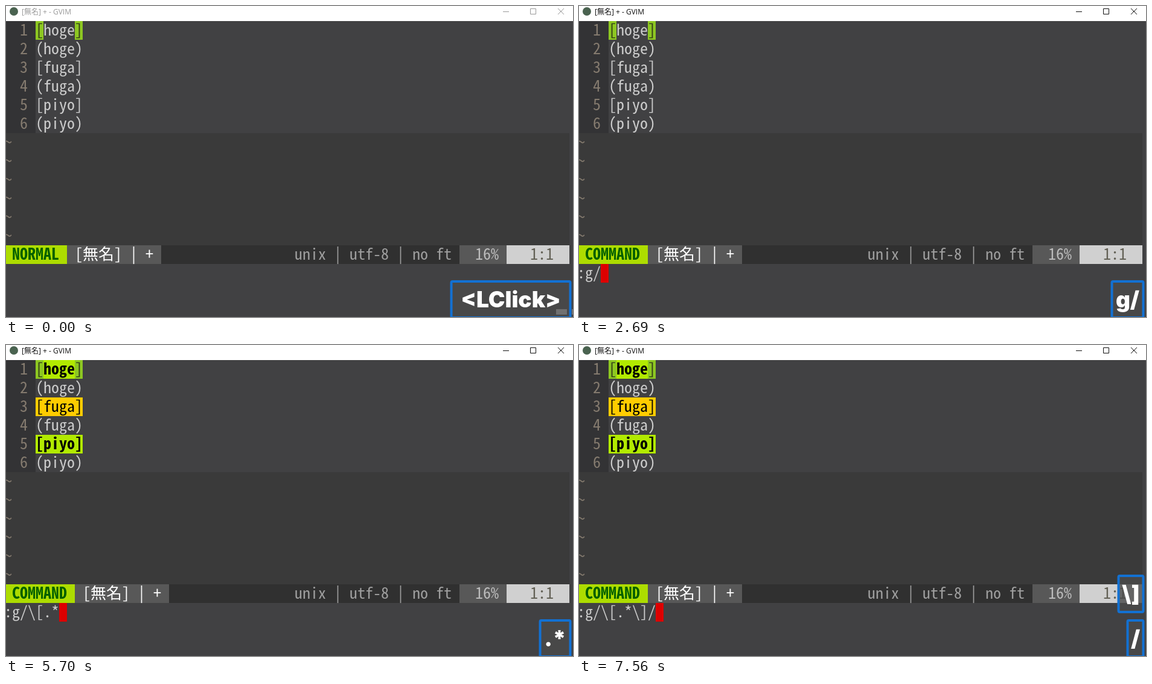
Recreate the animation shown at these times as an HTML page. Size 939x516 px, loop 8 s.

```html
<!DOCTYPE html>
<html lang="ja">
<head>
<meta charset="utf-8">
<title>Editor session</title>
<style>
html, body { margin: 0; width: 100%; height: 100%; overflow: hidden; background: #414143; }
svg { display: block; width: 939px; height: 516px; }
text { white-space: pre; }
.mono { font: 26px "Noto Sans Mono CJK JP", "Noto Sans CJK JP", "Noto Sans Mono", monospace; }
.bold { font-weight: 700; }
.title { font: 12px "Open Sans", "Noto Sans CJK JP", sans-serif; }
.pop { font: 900 37px Inter, "DejaVu Sans", sans-serif; text-anchor: middle; fill: #fff; }
</style>
</head>
<body>
<svg id="stage" viewBox="0 0 939 516"></svg>
<script>
const LOOP = 8000, CELL = 13, ROW = 31, TOP = 25;
const LINES = ['[hoge]', '(hoge)', '[fuga]', '(fuga)', '[piyo]', '(piyo)'];
const LIME = '#b2ea00', GOLD = '#ffcc00', PAREN = '#8dc722', RED = '#dd0000';

// time and text of the command line
const KEYS = [[210, ':'], [1590, 'g'], [1760, '/'], [3240, '\\'], [3720, '['],
  [5370, '.'], [5700, '*'], [6560, '\\'], [7250, ']'], [7560, '/']];
const BLINKS = [[910, 1110], [1510, 1590], [2490, 2690], [3090, 3240],
  [4450, 4710], [5110, 5370], [6430, 6560]];
const MATCHED = { ':g/\\[': 1, ':g/\\[.': 2, ':g/\\[.*': 6, ':g/\\[.*\\]': 6, ':g/\\[.*\\]/': 6 };

// key popups: start, end, label, width, slot, start of fade
const POPUPS = [
  [0, 70, '<LClick>', 201, 0],
  [210, 1590, ':', 33, 0, 1370],
  [1590, 1760, 'g', 46, 0],
  [1760, 3240, 'g/', 56, 0, 2990],
  [3240, 3720, '\\', 30, 0],
  [3720, 5370, '\\[', 45, 0, 4910],
  [5370, 5700, '.', 33, 0],
  [5700, 6560, '.*', 54, 0],
  [6560, 7250, '.*', 54, 1, 6960],
  [6560, 7250, '\\', 30, 0],
  [7250, 7560, '\\]', 45, 0],
  [7560, LOOP, '\\]', 45, 1],
  [7560, LOOP, '/', 30, 0]
];

const stage = document.getElementById('stage');
let layer = stage;

function add(tag, attrs, text) {
  const node = document.createElementNS('http://www.w3.org/2000/svg', tag);
  for (const name in attrs) node.setAttribute(name, attrs[name]);
  if (text) node.textContent = text;
  layer.append(node);
  return node;
}
const rect = (x, y, width, height, fill) => add('rect', { x, y, width, height, fill });
const colX = col => col * CELL - 3;
const rowY = row => TOP + row * ROW;
const block = (col, row, cells, fill) => rect(colX(col), rowY(row), cells * CELL, ROW, fill);

// text on the character grid; wide characters take two cells
function put(col, row, text, fill, bold) {
  const xs = [];
  for (const ch of text) {
    xs.push(colX(col));
    col += ch > '\u2fff' ? 2 : 1;
  }
  add('text', { x: xs.join(' '), y: rowY(row) + 24, fill, class: bold ? 'mono bold' : 'mono' }, text);
}
function mark(col, row, text, bg, fill, bold) {
  block(col, row, text.length, bg);
  put(col, row, text, fill, bold);
}

function drawTitle(active) {
  const ink = active ? '#111' : '#999';
  rect(0, 0, 939, TOP, '#fff');
  add('circle', { cx: 13, cy: 9, r: 7, fill: '#4a6350' });
  add('text', { x: 26, y: 14, fill: ink, class: 'title' }, '[無名] + - GVIM');
  add('path', { d: 'M823 9.5h10M868.5 4.5h9v9h-9zM914 4l10 10M924 4l-10 10', fill: 'none', stroke: ink });
}

function drawBuffer(matched, focused) {
  rect(0, TOP, 49, 6 * ROW, '#333335');
  rect(0, rowY(6), 933, 6 * ROW, '#3a3a3a');
  LINES.forEach((line, i) => {
    put(2, i, String(i + 1), '#857b6f');
    put(4, i, line, '#cccccc');
    if (matched && i % 2 === 0) {
      const gold = i === 2;
      mark(4, i, line.slice(0, matched), gold ? GOLD : LIME, '#000', !gold);
    }
    put(0, i + 6, '~', '#857b6f');
  });
  mark(4, 0, '[', focused ? RED : PAREN, focused ? '#fff' : '#303a18');
  mark(9, 0, ']', PAREN, '#303a18');
}

function drawStatus(mode) {
  const end = mode.length + 2;
  rect(0, 397, 933, ROW, '#303030');
  block(0, 12, end, '#addc00');
  put(1, 12, mode, '#005f00', true);
  block(end, 12, 12, '#585858');
  put(end + 1, 12, '[無名] | +', '#fff');
  put(37, 12, 'unix | utf-8 | no ft', '#9e9e9e');
  block(58, 12, 6, '#585858');
  put(60, 12, '16%', '#bcbcbc');
  block(64, 12, 8, '#d0d0d0');
  put(67, 12, '1:1', '#626055');
}

function drawPopup(label, width, slot, opacity) {
  const x = 936.5 - width, y = 455 - slot * 74, outer = layer;
  layer = add('g', { opacity });
  add('rect', { x: x + 2, y: y + 2, width: width - 4, height: 60, rx: 2,
    fill: 'rgba(74,74,74,.8)', stroke: '#1271d3', 'stroke-width': 4 });
  add('text', { x: x + width / 2, y: y + 45, class: 'pop' }, label);
  layer = outer;
}

function fade(age) {
  if (!(age >= 0)) return 1;
  return age < 90 ? 0.86 : Math.max(0, 0.58 - 0.2 * Math.floor((age - 90) / 60));
}

function draw(state) {
  const { cmd, active, cursor, popups } = state;
  stage.replaceChildren();
  rect(0, 0, 939, 516, '#414143');
  drawTitle(active);
  drawBuffer(MATCHED[cmd] || 0, active && !cmd);
  drawStatus(cmd ? 'COMMAND' : 'NORMAL');
  if (cmd) {
    put(0, 13, cmd, '#cccccc');
    if (cursor) block(cmd.length, 13, 1, RED);
  }
  popups.forEach(p => drawPopup(...p));
  if (!active) {
    rect(911, 503, 18, 9, '#707070');
    rect(937, 503, 2, 9, '#707070');
  }
}

function stateAt(t) {
  return {
    active: t >= 70,
    cmd: KEYS.filter(k => t >= k[0]).map(k => k[1]).join(''),
    cursor: !BLINKS.some(([off, on]) => t >= off && t < on),
    popups: POPUPS.filter(([from, to]) => t >= from && t < to)
      .map(([, , label, width, slot, out]) => [label, width, slot, fade(t - out)])
  };
}

let shown = '';
const start = performance.now();
function tick() {
  const state = stateAt((performance.now() - start) % LOOP);
  const key = JSON.stringify(state);
  if (key !== shown) {
    shown = key;
    draw(state);
  }
  requestAnimationFrame(tick);
}
tick();
</script>
</body>
</html>
```
